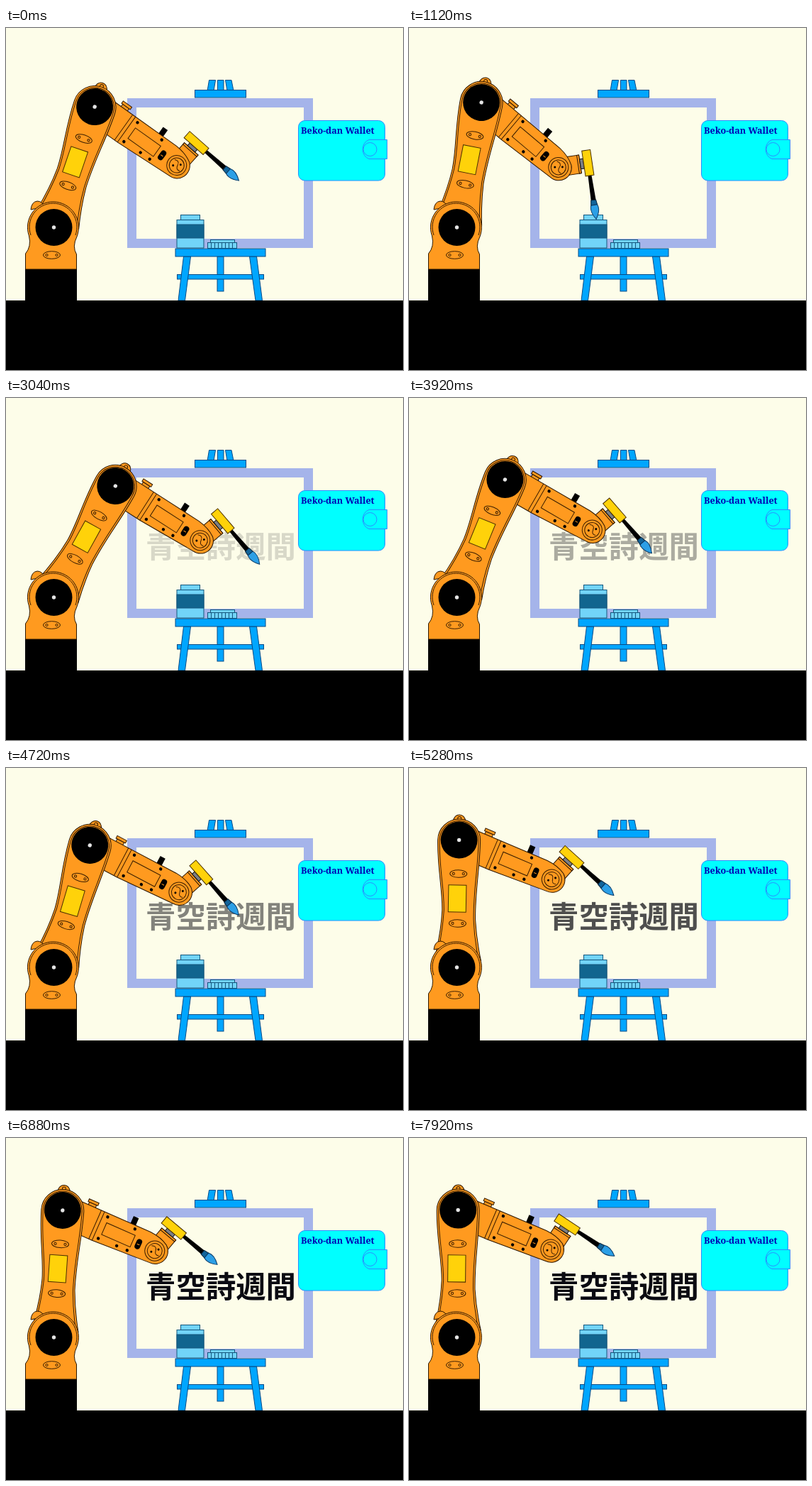
An HTML page for the animation above (8000 ms loop, 560 px wide and 482 px high).

```html
<!DOCTYPE html>
<html lang="en">
<head>
<meta charset="utf-8">
<title>Painting robot</title>
<style>
  html, body { margin: 0; width: 100%; height: 100%; overflow: hidden; background: #fdfde9; }
  svg { display: block; width: 560px; height: 482px; }
  .orange { fill: #ff9a1f; stroke: #2b1600; stroke-width: 1; }
  .line { fill: none; stroke: #3a1e00; stroke-width: 1; }
  .blue { fill: #00a6ff; stroke: #064a86; stroke-width: 1; }
  .pale { fill: #72d4f8; stroke: #14577c; stroke-width: 1; }
  .yellow { fill: #ffd20a; stroke: #4a3000; stroke-width: 1; }
  .wallet { fill: #00ffff; stroke: #2b8cff; stroke-width: 1; }
  .label { font: 700 12.6px "Noto Serif", serif; fill: #0000b4; }
  .sign { font: 700 42.4px "Noto Sans CJK JP", "Noto Sans CJK", sans-serif; fill: #0b0b12; }
</style>
</head>
<body>
<svg viewBox="0 0 560 482">
  <defs>
    <g id="plate">
      <ellipse class="line" rx="12" ry="5.3"/>
      <circle class="line" cx="-7" r="1.6"/>
      <circle class="line" cx="7" r="1.6"/>
    </g>
    <g id="joint">
      <circle r="26"/>
      <circle r="2.7" fill="#e4e4e4"/>
    </g>
  </defs>

  <rect width="560" height="482" fill="#fdfde9"/>

  <!-- easel -->
  <rect x="177.5" y="105.5" width="249" height="198" fill="none" stroke="#a5b4ea" stroke-width="13"/>
  <g class="blue">
    <path d="M286.500 73.500h9l-2.500 15h-9zM298.500 73.500h8.500v15h-8.500zM309.500 73.500h8.500l3 15h-9z"/>
    <rect x="266.500" y="87.500" width="72" height="10.500"/>
  </g>

  <!-- wallet -->
  <rect class="wallet" x="412.500" y="130.500" width="122" height="84.500" rx="9"/>
  <path class="wallet" d="M537.500 157.500H512a12 14 0 0 0 0 27h25.500z"/>
  <circle class="wallet" cx="513.500" cy="171" r="9.500"/>
  <text class="label" x="416" y="149">Beko-dan Wallet</text>

  <!-- table -->
  <g class="blue">
    <rect x="298" y="322" width="9" height="49"/>
    <rect x="241.500" y="347.500" width="122" height="6.500"/>
    <path d="M250.500 322h10l-8 62h-9.500zM343.500 322h10l8 62h-9.500z"/>
    <rect x="239" y="311" width="127" height="11"/>
  </g>
  <g class="pale">
    <rect x="246.500" y="263.500" width="27" height="7"/>
    <rect x="241" y="270.500" width="38" height="39.500"/>
    <rect x="241" y="277" width="38" height="19" fill="#11658f"/>
    <rect x="288.500" y="298.500" width="34" height="4"/>
    <rect x="284.500" y="302.500" width="41" height="8"/>
    <path d="M289.500 302v8m5-8v8m5-8v8m5-8v8m5-8v8m5-8v8m5-8v8"/>
  </g>

  <text id="sign" class="sign" x="197" y="225">青空詩週間</text>

  <!-- floor -->
  <rect y="384" width="560" height="98"/>
  <rect x="27" y="340" width="73" height="44"/>

  <!-- hand -->
  <g id="hand">
    <rect class="orange" x="-13" y="-31" width="26" height="24"/>
    <rect class="orange" x="-13" y="-31" width="26" height="3"/>
    <rect x="-7" y="-36" width="14" height="5" fill="#7b7f86" stroke="#111"/>
    <path d="M18 -44.500L54 -45.500V-38.500L18 -39.500z"/>
    <rect class="yellow" x="-18" y="-48" width="36" height="12"/>
    <path d="M53 -45.500L60 -46.500V-37.500L53 -38.500z" fill="#12649a" stroke="#08263f"/>
    <path d="M60 -46.500Q68 -50 80 -42Q73 -37 66 -36.500Q62 -36.500 60 -37.500z" fill="#2c9fe6" stroke="#0a3a66"/>
  </g>

  <!-- forearm -->
  <g id="forearm">
    <g class="orange">
      <rect x="30" y="-26" width="11" height="6"/>
      <rect x="28" y="-30" width="15" height="4"/>
    </g>
    <rect x="95" y="-33" width="8" height="12"/>
    <path class="orange" d="M10 -22H126Q143 -21 154 -14A18 18 0 0 1 142 18L55 22H10z"/>
    <path class="line" d="M55 -22V22M50 -22V22"/>
    <rect class="line" x="64" y="-9" width="44" height="18"/>
    <circle cx="62" cy="-17" r="2.200"/>
    <circle cx="104" cy="-17" r="2.200"/>
    <circle cx="62" cy="16" r="2.200"/>
    <circle cx="90" cy="15" r="2.200"/>
    <circle cx="106" cy="15" r="2.200"/>
    <rect x="113" y="-7" width="8" height="15" rx="4"/>
    <path d="M115 1h4" stroke="#ff9a1f"/>
    <g transform="translate(142)">
      <circle class="line" r="14"/>
      <circle class="line" r="10.500"/>
      <path class="line" d="M-7 -5Q0 -8 1 -1T8 4"/>
      <circle cx="-4" cy="3" r="1.500"/>
      <circle cx="4" cy="-4" r="1.500"/>
    </g>
  </g>

  <!-- upper arm -->
  <g id="arm">
    <path class="orange" d="M-9 -206Q-7 -215 0 -215T9 -206z"/>
    <circle class="line" cy="-210" r="2.500"/>
    <path class="orange" d="M-30 -179A30 30 0 0 1 30 -179C30 -140 24 -110 25 -68Q27 -40 34 -10H-32Q-23 -48 -22 -80C-22 -110 -30 -140 -30 -179z"/>
    <path class="line" d="M-27.500 -179A27.500 27.500 0 0 1 27.500 -179C27.500 -140 21.500 -110 22.500 -68Q24 -40 31 -10M-29 -10Q-21 -48 -19.500 -80C-19.500 -110 -27.500 -140 -27.500 -179"/>
    <use href="#joint" y="-179.500"/>
    <use href="#plate" y="-132"/>
    <use href="#plate" y="-62"/>
    <rect class="yellow" x="-13.500" y="-116" width="25" height="38"/>
  </g>

  <!-- base -->
  <path class="orange" d="M35 256Q36 245 44 244Q51 244 54 252z"/>
  <path class="orange" d="M27.500 340V318Q36 308 32.500 293A36 36 0 1 1 100 294Q93 308 99.500 319V340z"/>
  <path class="line" d="M35 292A33.500 33.500 0 1 1 98 292"/>
  <use href="#joint" x="67.500" y="281"/>
  <use href="#plate" x="64.500" y="320"/>
</svg>
<script>
  const LOOP = 8000, STEP = 80, UPPER = 179.5, FORE = 142;
  const SHOULDER = { x: 67.3, y: 281 };

  // time, upper arm from vertical, forearm and brush from horizontal
  const poses = [
    [0, 18.8, 35.5, 41.5],
    [600, 1.5, 27, 56],
    [1120, 11.2, 40.1, 81.5],
    [1840, 20.5, 39, 58],
    [3040, 29, 32.7, 49.5],
    [4720, 16.5, 27.8, 48.5],
    [5240, 1, 23, 42],
    [5920, 7.3, 23.8, 47],
    [6560, 1, 22.5, 38],
    [7200, 7, 25, 42],
    [7920, 0.6, 23, 33.5]
  ];
  const fade = [[0, 0], [2400, 0], [3040, 0.15], [4720, 0.5], [5920, 0.97], [6160, 1]];

  const linear = p => p;
  const smooth = p => p * p * (3 - 2 * p);
  const rad = deg => deg * Math.PI / 180;
  const byId = id => document.getElementById(id);
  const arm = byId("arm"), forearm = byId("forearm"), hand = byId("hand"), sign = byId("sign");

  function sample(keys, t, ease) {
    const next = keys.findIndex(k => k[0] > t);
    if (next < 0) return keys[keys.length - 1].slice(1);
    const a = keys[next - 1], b = keys[next];
    const p = ease((t - a[0]) / (b[0] - a[0]));
    return a.slice(1).map((v, i) => v + (b[i + 1] - v) * p);
  }

  function place(node, at, angle) {
    node.setAttribute("transform", `translate(${at.x} ${at.y}) rotate(${angle})`);
  }

  function reach(from, length, angle) {
    return { x: from.x + length * Math.cos(rad(angle)), y: from.y + length * Math.sin(rad(angle)) };
  }

  function draw(t) {
    const [lean, bend, brush] = sample(poses, t, smooth);
    const elbow = reach(SHOULDER, UPPER, lean - 90);
    const wrist = reach(elbow, FORE, bend);
    place(arm, SHOULDER, lean);
    place(forearm, elbow, bend);
    place(hand, wrist, brush);
    sign.setAttribute("opacity", sample(fade, t, linear)[0]);
  }

  const start = performance.now();
  function tick() {
    const t = (performance.now() - start) % LOOP;
    draw(Math.floor(t / STEP) * STEP);
    requestAnimationFrame(tick);
  }
  tick();
</script>
</body>
</html>
```
